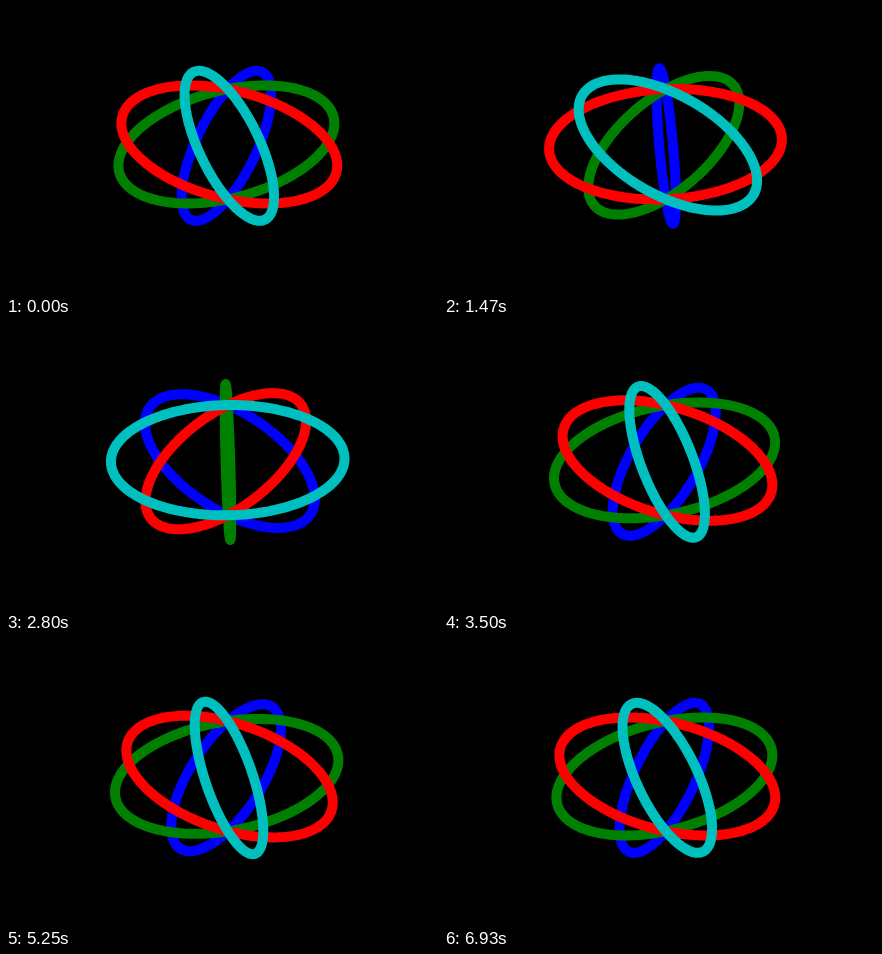
An HTML page for the animation above (7070 ms loop, 432 by 288 pixels).

```html
<!DOCTYPE html>
<html lang="en">
<head>
<meta charset="utf-8">
<title>Turning rings</title>
<style>
  html, body { margin: 0; width: 100%; height: 100%; overflow: hidden; background: #000; }
  svg { display: block; width: 100vw; height: 100vh; }
  path { fill: none; stroke-width: 10; stroke-linejoin: round; }
</style>
</head>
<body>
<svg id="stage" viewBox="0 0 432 288"></svg>
<script>
const W = 432, H = 288;
const STEP = 70, LAST = 99, LOOP = 7070;
const TURN = -4 * Math.PI / LAST;      // two full turns over the loop
const TILT = Math.PI / 4;              // camera elevation
const DEPTH = 0.05;                    // ring radius / camera distance
const RX = W * DEPTH / 0.185, RY = H * DEPTH / 0.185;
const CX = W * 0.95 / 1.85, CY = H * 0.9 / 1.85;
const POINTS = 120;
const COLORS = ['#0000ff', '#008000', '#ff0000', '#00bfbf'];

const stage = document.getElementById('stage');
const rings = COLORS.map((color, i) => {
  const path = document.createElementNS('http://www.w3.org/2000/svg', 'path');
  path.setAttribute('stroke', color);
  stage.appendChild(path);
  return { path, angle: (67.5 - 45 * i) * Math.PI / 180 };
});

// Outline of an upright ring turned about the vertical axis, in perspective.
function outline(angle) {
  const cosT = Math.cos(TILT), sinT = Math.sin(TILT);
  const pts = [];
  for (let i = 0; i < POINTS; i++) {
    const u = 2 * Math.PI * i / POINTS;
    const x = Math.sin(u) * Math.cos(angle);
    const back = Math.sin(u) * Math.sin(angle);
    const up = Math.cos(u);
    const near = up * sinT - back * cosT;
    const k = 1 / (1 - DEPTH * near);
    const y = up * cosT + back * sinT;
    pts.push((CX + RX * x * k).toFixed(2) + ' ' + (CY - RY * y * k).toFixed(2));
  }
  return 'M' + pts.join('L') + 'Z';
}

function draw(ms) {
  const step = Math.min(LAST, Math.floor((ms % LOOP) / STEP));
  for (const { path, angle } of rings) {
    path.setAttribute('d', outline(angle + step * TURN));
  }
}

const start = performance.now();
function tick() {
  draw(performance.now() - start);
  requestAnimationFrame(tick);
}
tick();
</script>
</body>
</html>
```
